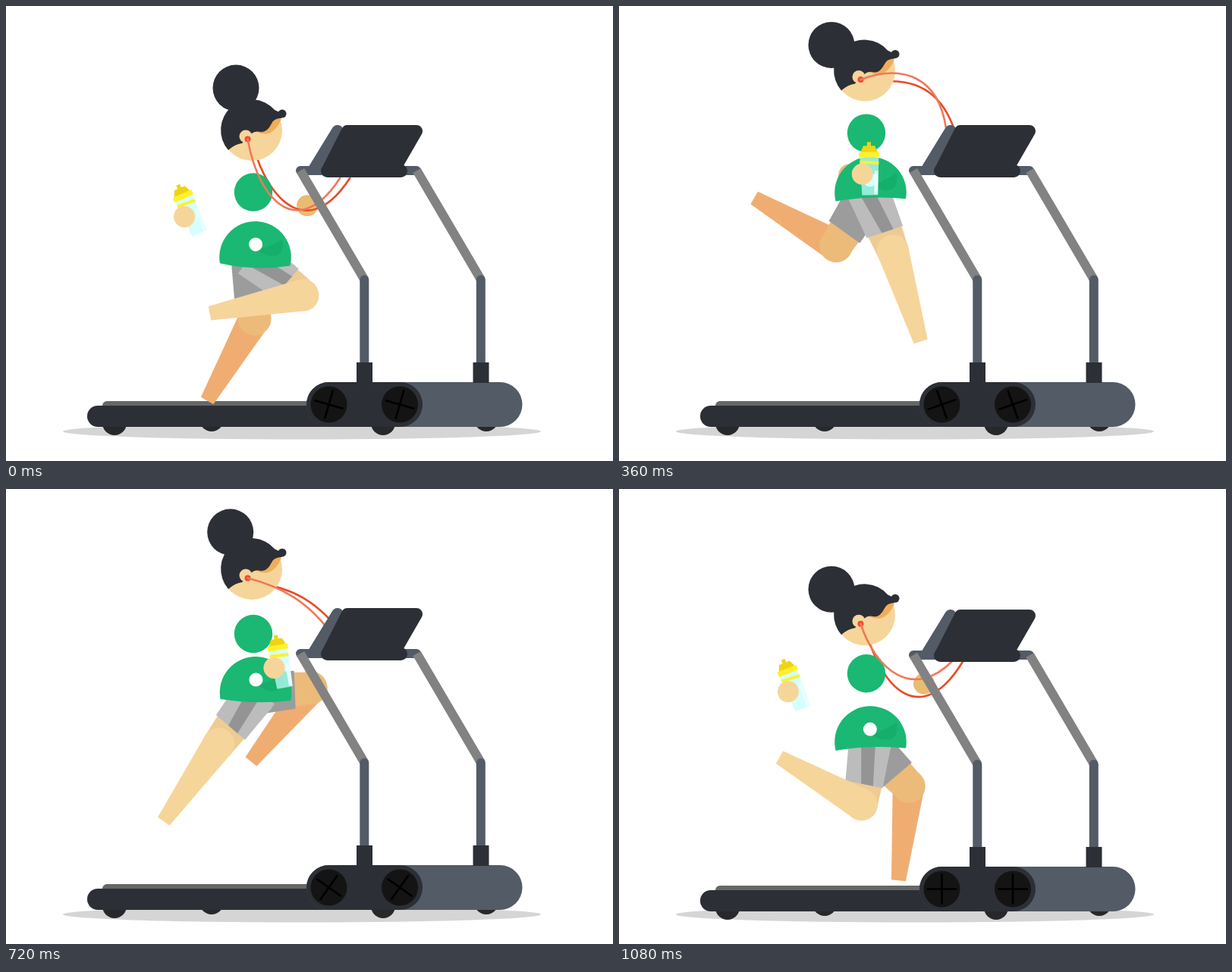
Animation of 800 by 600 pixels, one loop 1.16 s. Source, as an HTML page:

```html
<!DOCTYPE html>
<html lang="en">
<head>
<meta charset="utf-8">
<title>Treadmill run</title>
<style>
  html, body { margin: 0; width: 100%; height: 100%; overflow: hidden; background: #fff; }
  svg { display: block; width: 100vw; height: 100vh; }
</style>
</head>
<body>
<svg id="stage" viewBox="0 0 800 600"></svg>
<script>
const LOOP = 1160, STEP = 40, LAST = 27, CYCLE = 28, STRIDE = 15, PEAK = 6.2;
const DARK = '#2d2f36', SLATE = '#535b66', RAIL = '#828282', SKIN = '#f6d59a', TAN = '#e8bd72', GREEN = '#1ab873';
const THIGH = 'M-26 0L29 0L21 79A21 21 0 0 1 -21 79Z';

const wheel = (x, y) => `<circle cx="${x}" cy="${y}" r="16" fill="#27282b"/>`;
const fan = x => `<g transform="translate(${x} 525.5)"><circle r="24" fill="#141414"/>
  <path class="blades" d="M-20 0H20M0 -20V20" stroke="#000" stroke-width="2.6"/></g>`;
const post = x => `<path d="M${x} 217l84.5 144" stroke="${RAIL}" stroke-width="12"/>
  <path d="M${x + 84.3} 361V472" stroke="${SLATE}" stroke-width="12" stroke-linecap="round"/>
  <rect x="${x + 74}" y="470" width="21" height="27" fill="${DARK}"/>`;
const shin = color => `<path d="M-21 0A21 21 0 0 1 21 0L9.5 125H-9.5Z" fill="${color}"/>`;
const disc = (r, color) => `<circle r="${r}" fill="${color}"/>`;
const shorts = (hem, color) => `<path d="M-27 -6H29L25 ${hem + 2}L-25 ${hem - 2}Z" fill="${color}"/>`;
const cord = (id, color) => `<path id="${id}" fill="none" stroke="${color}" stroke-width="2.6" stroke-linecap="round"/>`;

const stage = document.getElementById('stage');
stage.innerHTML = `
<ellipse cx="390" cy="561" rx="315" ry="10.5" fill="#d5d5d5"/>
<g id="base">
  ${wheel(143, 550)}${wheel(271, 545)}${wheel(497, 550)}${wheel(633, 545)}
  <rect x="127" y="521" width="300" height="14" rx="6" fill="#666866"/>
  <rect x="107" y="527" width="340" height="28" rx="14" fill="${DARK}"/>
  <rect x="396" y="496" width="284.5" height="59" rx="29.5" fill="${SLATE}"/>
  <rect x="396" y="496" width="153" height="59" rx="29.5" fill="${DARK}"/>
  ${fan(425.5)}${fan(519)}
</g>
<g id="farHand">${disc(14, TAN)}</g>
<g id="farThigh">
  <g id="farShin">${shin('#f0ad72')}</g>
  <path d="${THIGH}" fill="#ecbb79"/>
  <circle cy="78" r="22" fill="#ecbb79"/>
  ${shorts(57, '#9c9c9c')}
</g>
${cord('farCord', '#e84c28')}
<g id="nearThigh">
  <path d="${THIGH}" fill="#eecb94"/>
  ${shorts(53, '#bcbcbc')}
  <path d="M-11 -6H8L12 54L-4 52.5Z" fill="#949494"/>
  <g id="nearShin">${disc(21, SKIN)}${shin(SKIN)}</g>
</g>
<g id="torso">
  <path id="shirt" fill="${GREEN}"/>
  <path d="M2 -10Q20 -15 35 -25Q38 -10 29 -4Q17 1 2 -10Z" fill="#16ae6b"/>
  <circle cy="-17" r="9" fill="#fff"/>
</g>
<g id="head">
  <g id="bun">${disc(30.5, DARK)}</g>
  ${disc(40, SKIN)}
  <path d="M4 1Q14 6 22 4Q33 0 39 -15L25 -16Z" fill="#f0ad5a"/>
  <path d="M-31 26A40 40 0 0 1 30 -27Q36 -24 40 -22L39 -16Q29 -16 26 -9Q20 3 12 2Q4 0 0 4L-13 17Q-22 18 -31 26Z" fill="${DARK}"/>
  <circle cx="40" cy="-22" r="5.5" fill="${DARK}"/>
  <circle cx="-8" cy="8" r="8.5" fill="${SKIN}"/>
  <circle cx="-5.5" cy="11.5" r="4" fill="#ef4e31"/>
</g>
<g id="chest">${disc(25.2, GREEN)}</g>
${cord('nearCord', '#f0795a')}
<g id="frame">
  <path d="M388 217H541" stroke="${SLATE}" stroke-width="12" stroke-linecap="round"/>
  ${post(388)}${post(541.5)}
  <path d="M437 165L407 214H424Z" fill="${SLATE}" stroke="${SLATE}" stroke-width="16" stroke-linejoin="round"/>
  <path d="M450 165H541L511 217H423.5Z" fill="${DARK}" stroke="${DARK}" stroke-width="16" stroke-linejoin="round"/>
  <path d="M423.5 217.5H520.5" stroke="${DARK}" stroke-width="17" stroke-linecap="round"/>
</g>
<g id="hand">
  <path d="M-3 -23H22L20 28H-1Z" fill="#c5ffff" opacity=".72"/>
  <path d="M16 -4H21L19.5 27H15Z" fill="#e6ffff"/>
  <path d="M-3 -18L22 -16V-12L-3 -14Z" fill="#fff12b"/>
  <path d="M7 -42H12V-36H7Z M2 -37H17L21 -28H-2Z" fill="#efd315"/>
  <rect x="-4" y="-29" width="27" height="7" rx="2" fill="#fff12b"/>
  ${disc(14, SKIN)}
</g>`;

// Key poses: phase, then values.
// One step cycle, used by both legs half a cycle apart: thigh and shin angle from straight down.
const gait = [[0, 46, -79], [1.8, 92, -44], [5.7, 55, 20], [11, 16, 10], [13.7, 53, -6], [14.5, 26, -32],
  [15, -5, -30], [16.8, -41, -34], [20.7, -34, -85], [26, -9, -143], [28.7, 1, -120], [29.5, 26, -119]];
const bottleSwing = [[0, -91, -24], [.5, -10, -23], [1.9, 8, -16], [5.8, 76, 3], [11.5, -95, -10], [13.8, -103, -22]];
const farSwing = [[0, 71], [1.9, 29], [5.8, -103], [11.5, 67], [13.8, 76]];
const leanKeys = [[0, 1], [2, .4], [6, -1], [12, -1], [16, .2], [21, 1], [27, -1]];

const clamp = u => Math.min(1, Math.max(0, u));
const smooth = u => (1 - Math.cos(Math.PI * clamp(u))) / 2;

// Smooth periodic interpolation that never overshoots its keys.
function sample(keys, phase, period) {
  const n = keys.length, at = phase % period;
  const key = k => keys[(k + n) % n];
  const time = k => key(k)[0] + period * Math.floor(k / n);
  let k = n - 1;
  while (keys[k][0] > at) k--;
  const span = time(k + 1) - time(k), u = (at - time(k)) / span;
  return keys[0].slice(1).map((_, c) => {
    const value = j => key(j)[c + 1];
    const slope = j => (value(j + 1) - value(j)) / (time(j + 1) - time(j));
    const tangent = j => {
      const a = slope(j - 1), b = slope(j);
      return a * b > 0 ? 2 * a * b / (a + b) : 0;
    };
    const a = value(k), b = value(k + 1);
    return a + (b - a) * u * u * (3 - 2 * u)
      + span * u * (1 - u) * (tangent(k) * (1 - u) - tangent(k + 1) * u);
  });
}

// The first stride is slower than the second; `middle` is the step where they meet.
function stridePhase(step, middle) {
  return step < middle ? STRIDE * step / middle : STRIDE * (1 + (step - middle) / (CYCLE - middle));
}

const part = {};
stage.querySelectorAll('[id]').forEach(el => part[el.id] = el);
const blades = stage.querySelectorAll('.blades');
const place = (el, x, y, angle = 0) => el.setAttribute('transform', `translate(${x} ${y}) rotate(${angle})`);

function poseLeg(side, x, y, length, phase, lean) {
  const [swing, lower] = sample(gait, phase, 2 * STRIDE);
  const thigh = swing + 8 * lean;
  place(part[side + 'Thigh'], x, y, -thigh);
  place(part[side + 'Shin'], 0, length, thigh - lower);
}

// Hands travel along a shallow arc below the chest.
function poseHand(el, chestY, x, angle) {
  place(el, 326 + x, chestY + 55 - .0045 * (x + 20) ** 2, angle);
}

// Cords fly up at the top of the hop and sag at the bottom.
function poseCord(el, x, y, reach, slack) {
  const pull = clamp(1.8 * slack);
  el.setAttribute('d', `M${x} ${y}C${reach - 45 * slack} ${76 + 205 * slack ** 1.2}
    ${reach + 46 - 34 * pull} ${94 + 240 * slack ** 1.3} ${reach + 56 + 10 * slack} ${161 + 66 * pull}`);
}

function draw(step) {
  const phase = stridePhase(step, 15.6), hop = phase % STRIDE;
  const legPhase = stridePhase(step, 16.4);
  const rising = hop < PEAK;
  const drop = smooth(rising ? (PEAK - hop) / 7.4 : (hop - PEAK) / 8.8) ** 1.3;
  const [lean] = sample(leanKeys, step, CYCLE);

  const headY = 75 + 97 * drop;
  const chestY = headY + 87 - (rising ? 6 * drop : 10 * smooth((hop - PEAK) / 5));
  const waistX = 330 - 1.5 * lean, waistY = headY + 160 + 8 * drop;
  const sweep = smooth((hop - 1) / 5);

  place(part.head, 324, headY);
  place(part.bun, -21 - 23 * sweep, -56 + 22 * sweep);
  place(part.chest, 326, chestY);
  place(part.torso, waistX, waistY, 2 * lean);
  part.shirt.setAttribute('d', `M-46.3 9.5A47.3 47.3 0 1 1 46.3 9.5Q0 ${11 + 7.5 * lean} -46.3 9.5Z`);

  poseHand(part.hand, chestY, ...sample(bottleSwing, hop, STRIDE));
  poseHand(part.farHand, chestY, ...sample(farSwing, hop, STRIDE));
  poseLeg('near', waistX - 2, waistY + 3, 80, legPhase, lean);
  poseLeg('far', waistX - 5, waistY + 3, 78, legPhase + STRIDE, lean);
  poseCord(part.nearCord, 318.5, headY + 11.5, 375, rising ? drop : Math.max(0, drop - .12));
  poseCord(part.farCord, 325, headY + 18, 388, drop);

  const shake = 3 * Math.max(0, Math.sin(Math.PI * clamp((hop - 10.5) / 4.3)));
  place(part.base, 0, shake);
  place(part.frame, 0, shake);
  blades.forEach(el => el.setAttribute('transform', `rotate(${16 + step * 450 / CYCLE})`));
}

const start = performance.now();
function tick() {
  const time = (performance.now() - start) % LOOP;
  draw(Math.min(LAST, Math.floor(time / STEP)));
  requestAnimationFrame(tick);
}
tick();
</script>
</body>
</html>
```
